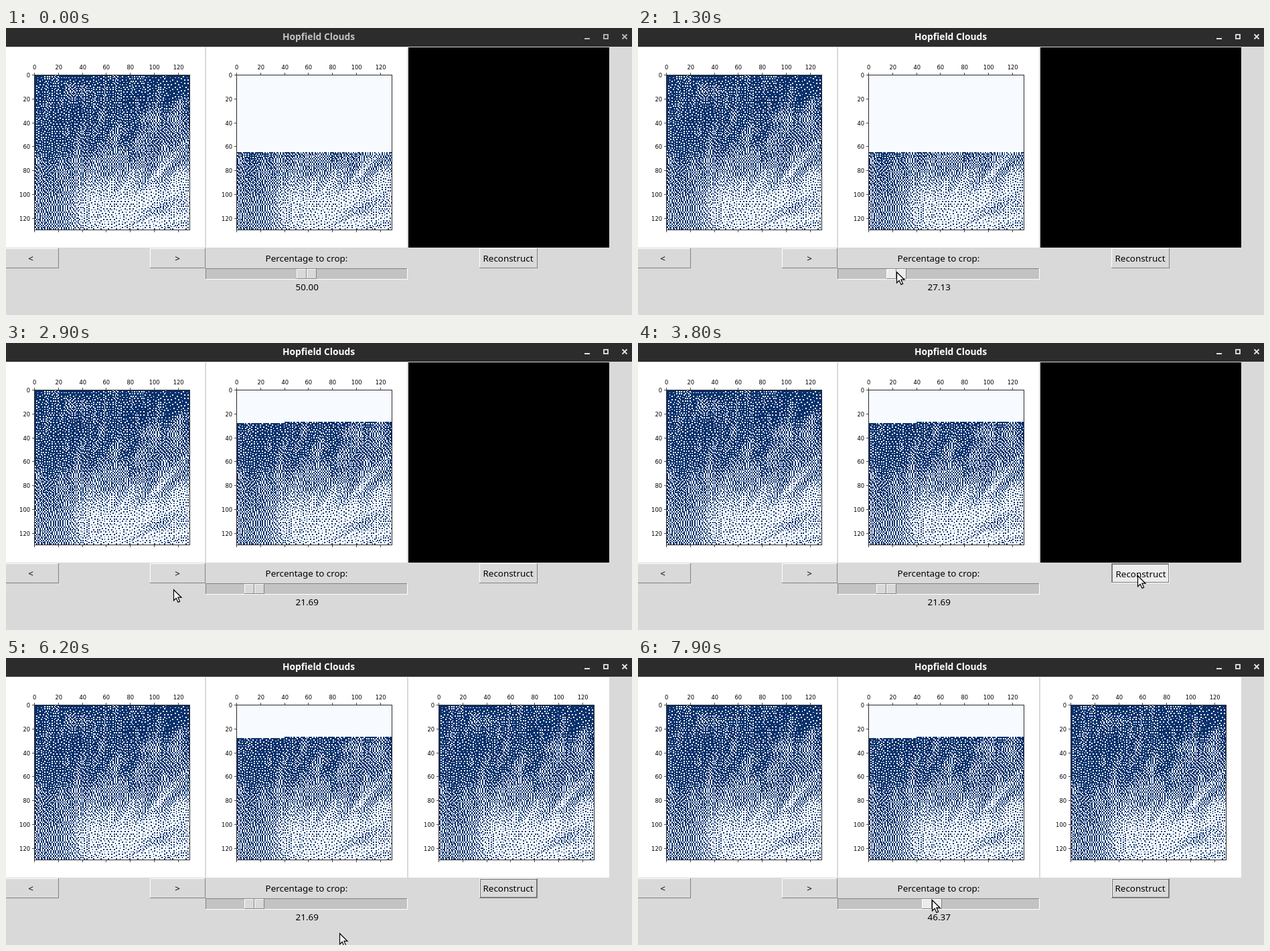
These frames come from a looping animation (935 by 430 pixels, 8 s). An HTML page with a canvas:

```html
<!DOCTYPE html>
<html lang="en">
<head>
<meta charset="utf-8">
<title>Hopfield Clouds</title>
<style>
html, body { margin: 0; width: 935px; height: 430px; overflow: hidden; background: #d9d9d9; }
canvas { display: block; }
</style>
</head>
<body>
<canvas id="stage" width="935" height="430"></canvas>
<script>
const ctx = document.getElementById('stage').getContext('2d');
const LOOP = 8000, STEP = 100, CELLS = 130, PLOT = 232;
const GREY = '#d9d9d9', ACTIVE = '#ececec', SHADE = '#828282';
const NAVY = [8, 48, 107], PALE = [247, 251, 255];
const UI = '500 13.4px "Noto Sans", sans-serif';
const PRESS = 3800, DONE = 6200;

const smooth = (a, b, v) => {
  const f = Math.min(1, Math.max(0, (v - a) / (b - a)));
  return f * f * (3 - 2 * f);
};

// Each drag: start, end, value reached
const drags = [[700, 1300, 27.13], [1900, 2100, 21.69], [7500, 7900, 46.37]];
const cropAt = t => drags.reduce((v, [a, b, to]) => v + (to - v) * smooth(a, b, t), 50);
const thumbAt = t => Math.round(434 + 2.755 * (cropAt(t) - 50));

// Free pointer moves: time, x, y; between them the pointer holds the thumb
const moves = [
  [[400, 348, 345], [600, 449, 365]],
  [[2900, 250, 369], [3100, 238, 368], [3700, 746, 348], [3900, 746, 348], [4000, 698, 387]],
  [[4300, 582, 427], [4500, 562, 427]],
  [[4800, 510, 422], [5100, 500, 414], [6400, 498, 412], [7300, 371, 362]]
];
function pointerAt(t) {
  if (t >= 700 && t < 2900) return [thumbAt(t) + 15, 365];
  if (t > 7300) return [thumbAt(t) + 15, 362];
  const path = moves.find(p => t >= p[0][0] && t < p[p.length - 1][0] + STEP);
  return path && [1, 2].map(n => Math.round(path.reduce(
    (v, key, i) => i ? v + (key[n] - path[i - 1][n]) * smooth(path[i - 1][0], key[0], t) : key[n], 0)));
}

// Cloud picture: smooth tones reduced to two colours by error diffusion
const hash = (i, j) => {
  const s = Math.sin(i * 127.1 + j * 311.7) * 43758.5453;
  return s - Math.floor(s);
};
function noise(x, y) {
  const i = Math.floor(x), j = Math.floor(y), u = smooth(0, 1, x - i), v = smooth(0, 1, y - j);
  const row = n => hash(i, n) * (1 - u) + hash(i + 1, n) * u;
  return row(j) * (1 - v) + row(j + 1) * v;
}
function tone(x, y) {
  const right = smooth(15, 115, x), low = smooth(50, 108, y);
  const dx = x - 40, dy = y - 150;
  const ray = noise(Math.atan2(dy, dx) * 17, Math.hypot(dx, dy) / 15) - 0.5;
  const wisp = Math.max(0, noise(x / 4.5, y / 12) - 0.6);
  const glow = Math.exp(-(((x - 65) / 32) ** 2) - ((y - 118) / 25) ** 2);
  const corner = (1 - smooth(10, 42, x - (y - 90) * 0.2)) * low;
  const value = 0.13 + 0.0017 * y + 0.33 * low + 0.12 * right * smooth(0, 50, y)
    + ray * (0.1 + 0.35 * right) * smooth(-20, 40, y) + 0.7 * wisp * (1 - low)
    + 0.14 * glow - 0.2 * corner;
  return Math.min(0.84, Math.max(0.11, value));
}
function makeClouds() {
  const canvas = document.createElement('canvas');
  canvas.width = canvas.height = CELLS;
  const c = canvas.getContext('2d'), image = c.createImageData(CELLS, CELLS);
  let error = new Float32Array(CELLS + 2);
  for (let y = 0; y < CELLS; y++) {
    const next = new Float32Array(CELLS + 2);
    for (let x = 0; x < CELLS; x++) {
      const value = tone(x, y) + error[x + 1], light = value > 0.5, e = (value - light) / 16;
      error[x + 2] += e * 7;
      next[x] += e * 3;
      next[x + 1] += e * 5;
      next[x + 2] += e;
      image.data.set([...(light ? PALE : NAVY), 255], (y * CELLS + x) * 4);
    }
    error = next;
  }
  c.putImageData(image, 0, 0);
  return canvas;
}
const clouds = makeClouds();

function rect(x, y, w, h, color) {
  ctx.fillStyle = color;
  ctx.fillRect(x, y, w, h);
}
function text(str, x, y, font = UI, color = '#000', align = 'center') {
  ctx.font = font;
  ctx.fillStyle = color;
  ctx.textAlign = align;
  ctx.fillText(str, x, y);
}
function bevel(x, y, w, h, fill, sunken) {
  rect(x, y, w, h, sunken ? '#fff' : SHADE);
  rect(x, y, w - 1, h - 1, sunken ? SHADE : '#fff');
  rect(x + 1, y + 1, w - 2, h - 2, fill);
}
const inside = (p, x, y, w, h) => p && p[0] >= x && p[0] < x + w && p[1] >= y && p[1] < y + h;

function plot(panel, crop = 0) {
  const x = panel + 46, y = 70, size = PLOT / CELLS;
  rect(panel, 29, 300, 300, '#fff');
  ctx.imageSmoothingEnabled = false;
  ctx.drawImage(clouds, x, y, PLOT, PLOT);
  const hidden = Math.floor(CELLS * CELLS * crop / 100), row = Math.floor(hidden / CELLS);
  const px = n => Math.round(n * size), pale = `rgb(${PALE})`;
  rect(x, y, PLOT, px(row), pale);
  rect(x, y + px(row), px(hidden % CELLS), px(row + 1) - px(row), pale);
  ctx.strokeStyle = '#2a2a2a';
  ctx.lineWidth = 1;
  ctx.strokeRect(x - 0.5, y + 0.5, PLOT, PLOT);
  const font = '8.33px "DejaVu Sans", sans-serif';
  for (let n = 0; n < CELLS; n += 20) {
    const d = Math.round((n + 0.5) * size - 0.5);
    rect(x + d - 1, y - 3, 1, 3, '#444');
    rect(x + d - 1, y + PLOT + 1, 1, 3, '#444');
    rect(x - 4, y + d, 3, 1, '#444');
    text(n, x + d - 0.3, 62, font);
    text(n, x - 7, y + d + 3.5, font, '#000', 'right');
  }
}

function titleBar(focused) {
  const color = focused ? '#fff' : '#c4c4c4';
  rect(0, 0, 935, 28, '#2c2c2c');
  text('Hopfield Clouds', 467, 18, 'bold 13.8px "Noto Sans", sans-serif', color);
  ctx.strokeStyle = focused ? '#e4e4e4' : '#bbb';
  ctx.lineWidth = 1.8;
  ctx.strokeRect(893, 10, 6, 6);
  ctx.beginPath();
  ctx.moveTo(864, 16);
  ctx.lineTo(872, 16);
  ctx.moveTo(920.5, 9.5);
  ctx.lineTo(927.5, 16.5);
  ctx.moveTo(927.5, 9.5);
  ctx.lineTo(920.5, 16.5);
  ctx.stroke();
}

function slider(t, pointer) {
  const x = thumbAt(t), fill = inside(pointer, x, 361, 30, 15) ? ACTIVE : GREY;
  bevel(298, 360, 302, 17, '#c3c3c3', true);
  for (const half of [x, x + 15]) bevel(half, 361, 15, 15, fill);
  text(cropAt(t).toFixed(2), 449.7, 393);
}

function reconstructButton(t, pointer) {
  const pressed = t >= PRESS && t < DONE, shift = pressed ? 1 : 0;
  bevel(707, 330, 87, 30, pressed || inside(pointer, 707, 330, 87, 30) ? ACTIVE : GREY, pressed);
  if (t >= PRESS) {
    ctx.strokeStyle = '#000';
    ctx.lineWidth = 1;
    ctx.setLineDash([1, 1]);
    ctx.strokeRect(708.5, 331.5, 84, 27);
    ctx.setLineDash([]);
  }
  text('Reconstruct', 750 + shift, 350 + shift);
}

const arrow = new Path2D('M.5 .8V16.8L4.2 13.3 7 19.4 9.6 18.2 6.9 12.2H12Z');
function drawPointer([x, y]) {
  ctx.save();
  ctx.translate(x, y);
  ctx.fillStyle = '#fff';
  ctx.fill(arrow);
  ctx.strokeStyle = '#000';
  ctx.lineWidth = 1.2;
  ctx.stroke(arrow);
  ctx.restore();
}

function draw(t) {
  const pointer = pointerAt(t);
  rect(0, 0, 935, 430, GREY);
  titleBar(t >= 700);
  plot(-3);
  plot(299, t < 1600 ? 50 : t < 2400 ? 27 : 21);
  if (t < DONE) rect(601, 29, 300, 300, '#000');
  else plot(601);
  bevel(-4, 330, 83, 30, GREY);
  text('<', 37, 350);
  bevel(215, 330, 83, 30, GREY);
  text('>', 256, 350);
  text('Percentage to crop:', 449, 350);
  slider(t, pointer);
  reconstructButton(t, pointer);
  if (pointer) drawPointer(pointer);
}

const start = performance.now();
function tick() {
  const t = (performance.now() - start) % LOOP;
  draw(Math.floor(t / STEP) * STEP);
  requestAnimationFrame(tick);
}
tick();
</script>
</body>
</html>
```
